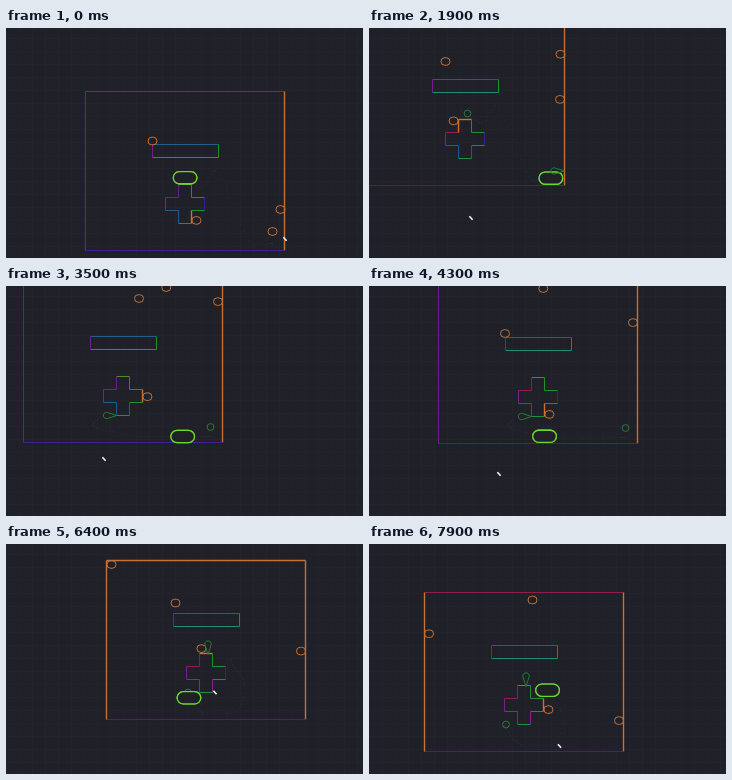
Write an HTML page with a canvas that moves like this. It is 357x230 px and loops after 8000 ms.

```html
<!DOCTYPE html>
<html lang="en">
<head>
<meta charset="utf-8">
<title>Outline arena</title>
<style>
  html, body { margin: 0; width: 100%; height: 100%; overflow: hidden; background: #1f2028; }
  canvas { display: block; width: 357px; height: 230px; }
</style>
</head>
<body>
<canvas id="stage" width="357" height="230"></canvas>
<script>
const ctx = document.getElementById('stage').getContext('2d');
const LOOP = 8, STEP = 0.1;
const BACK = '#1f2028', ORANGE = '#cc7030', LIME = '#6cd82c', GREEN = '#2a7a35';

const rect = (x, y, w, h) => [[x, y], [x + w, y], [x + w, y + h], [x, y + h]];

// Twelve corners of a plus sign: three corners, turned four times
function plus(half, reach) {
  const points = [];
  let arm = [[-half, -reach], [half, -reach], [half, -half]];
  for (let turn = 0; turn < 4; turn++) {
    points.push(...arm.map(([x, y]) => [99.5 + x, 112.5 + y]));
    arm = arm.map(([x, y]) => [-y, x]);
  }
  return points;
}

const box = { points: rect(0, 0, 199, 159), hues: [335, 28, 262, 282] };
const bar = { points: rect(67, 53, 66, 13), hues: [205, 125, 165, 285] };
const cross = {
  points: plus(6.5, 19.5),
  hues: [95, 125, 130, 255, 130, 300, 140, 210, 205, 290, 335, 280]
};

// Keys are [seconds, x, y]; the camera gives the box's top left corner
const camera = [
  [0, 79, 63.5], [.3, 85, 66], [.8, 63.5, 54.5], [1.1, 48, 70], [1.6, 16, -1], [1.9, -3, -1],
  [2.3, -7, -2], [3.1, -3, -3], [3.5, 17, -2.5], [4.3, 69.5, -2], [4.9, 110, 8], [5.4, 101, 17.5],
  [6.2, 100, 17.5], [6.4, 100, 16], [6.8, 84, -2], [7.2, 52, -2], [7.5, 42, 25], [7.9, 55.5, 48.5]
];
const cursor = [[0, 279, 211], [.8, 190, 240], [1.9, 102, 190], [3.5, 98, 173],
  [4.3, 130, 188], [6.4, 209, 148.5], [7.9, 190.5, 202]];
const hopper = [[0, 67, 49.5], [.8, 116, 39.5], [1.9, 80, 35], [3.5, 115.5, 15],
  [4.3, 66.5, 49], [6.4, 69, 42.5], [7.9, 108, 7.5]];

const climber = [[195, 118], [195, 4], [4.5, 4], [4.5, 155]];
const faller = [[187, 140], [194.5, 145.5], [194.5, 10.8], [194.5, 155]];
const circler = plus(11.4, 24.4);

// Waypoints: ring centre, then drop centre and its tip
const spots = [
  { ring: [102, 87], drop: [101.5, 83.5], tip: [101.5, 94] },
  { ring: [187, 143.5], drop: [188.5, 144.5], tip: [199, 144.5] },
  { ring: [81.5, 132], drop: [83, 132], tip: [93, 132] }
];
const legs = [[.15, 2.6], [2.6, 5.2], [5.2, 7.9]];

function segment(keys, t) {
  let i = 0;
  while (i < keys.length - 2 && t >= keys[i + 1][0]) i++;
  return i;
}

function linear(keys, t) {
  const i = segment(keys, t), a = keys[i], b = keys[i + 1];
  const u = (t - a[0]) / (b[0] - a[0]);
  return [1, 2].map(k => a[k] + (b[k] - a[k]) * u);
}

// Cubic through the keys
function smooth(keys, t) {
  const i = segment(keys, t), a = keys[i], b = keys[i + 1];
  const before = keys[i - 1] || a, after = keys[i + 2] || b;
  const d = b[0] - a[0], u = (t - a[0]) / d, u2 = u * u, u3 = u2 * u;
  return [1, 2].map(k => {
    const m = (b[k] - before[k]) / (b[0] - before[0]) * d;
    const n = (after[k] - a[k]) / (after[0] - a[0]) * d;
    return (2 * u3 - 3 * u2 + 1) * a[k] + (u3 - 2 * u2 + u) * m +
      (3 * u2 - 2 * u3) * b[k] + (u3 - u2) * n;
  });
}

// The camera trails the player a little
function player(t) {
  const [x, y] = smooth(camera, t + .07);
  return [Math.min(180.5 - x, 187), Math.min(150.5 - y, 153)];
}

// Walkers descend at about half their usual speed
function walk(path, time) {
  for (let i = 0; ; i = (i + 1) % path.length) {
    const [x, y] = path[i], [p, q] = path[(i + 1) % path.length];
    const cost = Math.hypot(p - x, q - y) / (q - y > 1 ? 25 : 47.5);
    if (time <= cost) return [x + (p - x) * time / cost, y + (q - y) * time / cost];
    time -= cost;
  }
}

function gap([x, y], [ax, ay], [bx, by]) {
  const dx = bx - ax, dy = by - ay;
  const u = Math.max(0, Math.min(1, ((x - ax) * dx + (y - ay) * dy) / (dx * dx + dy * dy)));
  return Math.hypot(x - ax - dx * u, y - ay - dy * u);
}

function line(a, b, color, width) {
  ctx.strokeStyle = color;
  ctx.lineWidth = width;
  ctx.beginPath();
  ctx.moveTo(...a);
  ctx.lineTo(...b);
  ctx.stroke();
}

// An edge takes the walkers' colour while one touches it
function outline({ points, hues }, balls) {
  points.forEach((a, i) => {
    const b = points[(i + 1) % points.length];
    const touched = balls.some(p => gap(p, a, b) < 5.2);
    line(a, b, touched ? ORANGE : `hsl(${hues[i]} 66% 34%)`, touched ? 1.4 : 1);
  });
}

function pill(x, y, w, h, color, width) {
  ctx.strokeStyle = color;
  ctx.lineWidth = width;
  ctx.beginPath();
  ctx.roundRect(x - w / 2, y - h / 2, w, h, h / 2);
  ctx.stroke();
}

function drop({ drop: [x, y], tip: [tx, ty] }) {
  const angle = Math.atan2(ty - y, tx - x);
  ctx.strokeStyle = GREEN;
  ctx.lineWidth = 1;
  ctx.beginPath();
  ctx.arc(x, y, 3.2, angle + 1.2, angle - 1.2);
  ctx.lineTo(tx, ty);
  ctx.closePath();
  ctx.stroke();
}

function grid() {
  for (let x = .5; x < 357; x += 13) line([x, 0], [x, 230], '#22242c', 1);
  for (let y = 10.5; y < 230; y += 13) line([0, y], [357, y], '#22242c', 1);
}

function trail([from, to]) {
  ctx.fillStyle = '#252d2e';
  for (let t = from; t < to; t += .04) {
    const [x, y] = player(t);
    ctx.fillRect(Math.round(x) - .5, Math.round(y) - .5, 1, 1);
  }
}

function draw(t) {
  ctx.fillStyle = BACK;
  ctx.fillRect(0, 0, 357, 230);
  grid();

  const balls = [
    linear(hopper, t), walk(climber, t), walk(faller, t), walk(circler, 2.66 + t * 1.18)
  ];
  const leg = t < legs[0][1] ? 0 : t < legs[1][1] ? 1 : 2;
  const [left, top] = smooth(camera, t).map(v => Math.floor(v) + .5);
  const [px, py] = player(t);

  ctx.save();
  ctx.translate(left, top);
  trail(legs[leg]);
  outline(box, balls);
  outline(bar, []);
  outline(cross, balls);
  pill(...spots[leg].ring, 6.8, 6.8, GREEN, 1);
  balls.forEach(([x, y]) => pill(x, y, 9, 7.6, ORANGE, 1));
  pill(px, py, 23.6, 12.2, LIME, 1.3);
  ctx.fillStyle = BACK;
  ctx.fill();
  pill(px, py, 23.6, 12.2, LIME, 1.3);
  if (t > legs[0][0]) drop(spots[(leg + 1) % 3]);
  ctx.restore();

  const [x, y] = linear(cursor, t);
  line([x - 1.6, y - 1.8], [x + 1.6, y + 1.8], '#f4f4f4', 1.6);
}

const start = performance.now();
function tick() {
  const t = (performance.now() - start) / 1000 % LOOP;
  draw(Math.floor(t / STEP + 1e-6) * STEP);
  requestAnimationFrame(tick);
}
tick();
</script>
</body>
</html>
```
